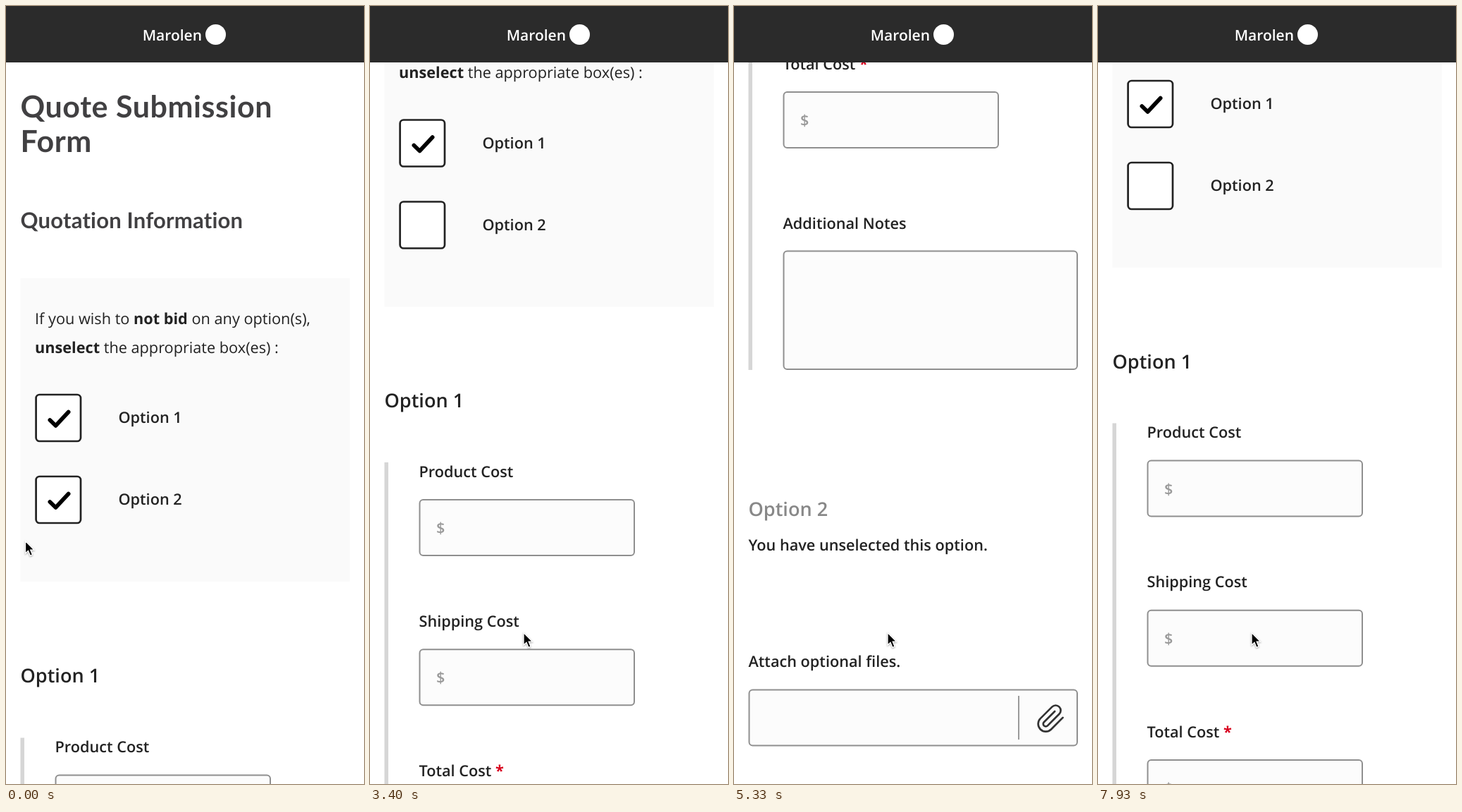
Write an HTML page that moves like this. It is 508 by 1103 pixels and loops after 8000 ms.

```html
<!DOCTYPE html>
<html lang="en">
<head>
<meta charset="utf-8">
<title>Quote form</title>
<style>
  html, body { margin: 0; width: 100%; height: 100%; overflow: hidden; background: #fff; }
  svg { display: block; width: 100%; height: 100%; }
  text { font: 400 21.7px "Open Sans", sans-serif; fill: #222; text-rendering: geometricPrecision; white-space: pre; }
  .title { font: 700 43px Lato, sans-serif; letter-spacing: .55px; fill: #414042; }
  .subtitle { font: 700 31px Lato, sans-serif; letter-spacing: .2px; fill: #414042; }
  .semi { font-weight: 600; }
  .head { font-weight: 600; font-size: 27.1px; }
  .bold { font-weight: 700; }
  .muted { fill: #888; }
  .dollar { font-weight: 600; fill: #999; }
  .star { font-weight: 700; fill: #d8001d; }
  .white { fill: #fff; }
  .mid { text-anchor: middle; }
  .brand { font-weight: 600; font-size: 21px; fill: #fff; text-anchor: end; }
  .field { fill: #fcfcfc; stroke: #8f8f8f; stroke-width: 2; }
  .box { fill: #fff; stroke: #222; stroke-width: 2.7; }
  .tick { fill: none; stroke: #000; stroke-width: 5.6; stroke-linecap: round; stroke-linejoin: round; }
  .clip { fill: none; stroke: #333; stroke-width: 1.5; stroke-linecap: round; stroke-linejoin: round; }
  #cursor { filter: drop-shadow(0 1.5px 1.2px rgba(0, 0, 0, .35)); }
</style>
</head>
<body>
<svg viewBox="0 0 508 1103">
  <g id="page">
    <g id="top"></g>
    <g id="costs"></g>
    <g id="rest"></g>
  </g>
  <rect width="508" height="80" fill="#2b2b2b"/>
  <text class="brand" x="278" y="49">Marolen</text>
  <circle cx="297.5" cy="40.5" r="14.5" fill="#fff"/>
  <g id="cursor">
    <path id="arrow" d="M0 0V17.5L4 13.8L6.8 20.8L10 19.5L7.2 12.6H12.4Z" fill="#000" stroke="#fff" stroke-width="1.3"/>
    <path id="hand" transform="translate(-8 -1)" fill="#fff" stroke="#000" stroke-width="1.4" stroke-linejoin="round"
      d="M7 21.5L3 15C1 12 2.5 10.5 4.5 11.5L6.5 13V3C6.5 .5 10 .5 10 3V8.5C11 7.5 13 7.8 13.3 9C14.5 8.2 16 8.7 16.4 10C18 9.3 19.5 10.3 19.5 12V15.5C19.5 18 18 19 18 21.5Z"/>
  </g>
</svg>
<script>
  const $ = id => document.getElementById(id);
  const text = (x, y, str, cls = "") => `<text x="${x}" y="${y}" class="${cls}">${str}</text>`;
  const rect = (x, y, w, h, r, cls, extra = "") =>
    `<rect x="${x}" y="${y}" width="${w}" height="${h}" rx="${r}" class="${cls}" ${extra}/>`;

  const checkbox = (n, y) =>
    rect(42.6, y, 63.4, 66, 5, "box") +
    `<path id="tick${n}" class="tick" d="M62.3 ${y + 36}l8.2 8l18.2 -19.5"/>` +
    text(159.5, y + 40, "Option " + n, "semi");

  const cost = (y, label) =>
    text(69.5, y, label, "semi") + rect(70.5, y + 32.5, 304.5, 79, 5, "field") +
    text(94, y + 80.5, "$", "dollar");

  $("top").innerHTML =
    text(20.5, 158, "Quote Submission", "title") +
    text(20.5, 207, "Form", "title") +
    text(20.5, 314.5, "Quotation Information", "subtitle") +
    rect(20.5, 386, 467.5, 430, 0, "", 'fill="#fafafa"') +
    text(41, 451, 'If you wish to <tspan class="bold">not bid</tspan> on any option(s),') +
    text(41, 491.5, '<tspan class="bold">unselect</tspan> the appropriate box(es) :') +
    checkbox(1, 551) + checkbox(2, 667) +
    text(20.5, 958.5, "Option 1", "head");

  $("costs").innerHTML =
    rect(20.5, 1037.5, 5.5, 871.5, 0, "", 'fill="#d6d6d6"') +
    cost(1058, "Product Cost") +
    cost(1270.3, "Shipping Cost") +
    cost(1482.6, 'Total Cost <tspan class="star">*</tspan>') +
    text(69.5, 1708.8, "Additional Notes", "semi") +
    rect(70.5, 1740.5, 416.5, 167.5, 5, "field");

  $("rest").innerHTML =
    text(20.5, 2115, "Option 2", "head muted") +
    text(20.5, 2164, "You have unselected this option.", "semi") +
    text(20.5, 2329, "Attach optional files.", "semi") +
    rect(21.5, 2361.5, 465.5, 79, 5, "field") +
    '<path d="M404 2370V2432" stroke="#8f8f8f" stroke-width="1.8"/>' +
    '<path class="clip" transform="translate(428 2381) scale(1.8)" d="M21.44 11.05l-9.19 9.19a6 6 0 0 1-8.49-8.49l9.19-9.19a4 4 0 0 1 5.66 5.66l-9.2 9.19a2 2 0 0 1-2.83-2.83l8.49-8.48"/>' +
    rect(35.3, 2579.8, 203.4, 84.5, 7, "box") +
    text(137, 2632, "Back", "head mid") +
    rect(268, 2578.5, 206, 87, 7, "", 'fill="#00a810"') +
    text(372.5, 2627, "Next", "head bold white mid");

  // Time is counted in steps of 1/15 s, 120 per loop.
  const STEPS = 120, UNCHECK = 28;
  const scrollKeys = [
    [42, 0], [43, 9.5], [44, 45], [45, 110], [47, 260], [49, 355], [50, 378], [51, 389.5],
    [55, 389.5], [56, 400], [57, 460], [59, 670], [61, 805], [62, 838], [63, 850],
    [66, 850], [67, 875], [69, 1055.5], [71, 1230], [73, 1315], [75, 1352], [79, 1385],
    [80, 1392], [81, 1435], [82, 1490], [83, 1530], [84, 1552], [86, 1566.5],
    [106, 1566.5], [107, 1555], [108, 1500], [110, 1270], [113, 880], [116, 600], [118, 480], [119, 445]
  ];
  const cursorKeys = [
    [0, 27.5, 758.5], [1, 33, 753], [3, 68, 722], [5, 83, 709],
    [6, 83, 709], [9, 84, 708.7], [16, 84, 708.7], [21, 85, 708],
    [34, 85, 708], [35, 118, 752], [36, 190, 850], [37, 218, 888.5]
  ];

  function sample(keys, n) {
    const i = keys.findIndex(k => k[0] > n);
    if (i === 0) return keys[0].slice(1);
    if (i < 0) return keys[keys.length - 1].slice(1);
    const a = keys[i - 1], b = keys[i], p = (n - a[0]) / (b[0] - a[0]);
    return a.slice(1).map((v, j) => v + (b[j + 1] - v) * p);
  }

  const show = (id, on) => $(id).setAttribute("visibility", on ? "visible" : "hidden");
  const move = (id, x, y) => $(id).setAttribute("transform", `translate(${x} ${y})`);

  function draw(n) {
    const [scroll] = sample(scrollKeys, n), [x, y] = sample(cursorKeys, n);
    const hover = x > 41 && x < 107 && y > 666 && y < 734;
    move("page", 0, -scroll);
    move("costs", 0, n < UNCHECK ? 0 : -1);
    show("tick2", n < UNCHECK);
    move("cursor", x, y);
    show("arrow", !hover);
    show("hand", hover);
  }

  const start = performance.now();
  function tick() {
    const t = performance.now() - start;
    draw(Math.floor(t * 0.015 + 0.06) % STEPS);
    requestAnimationFrame(tick);
  }
  tick();
</script>
</body>
</html>
```
